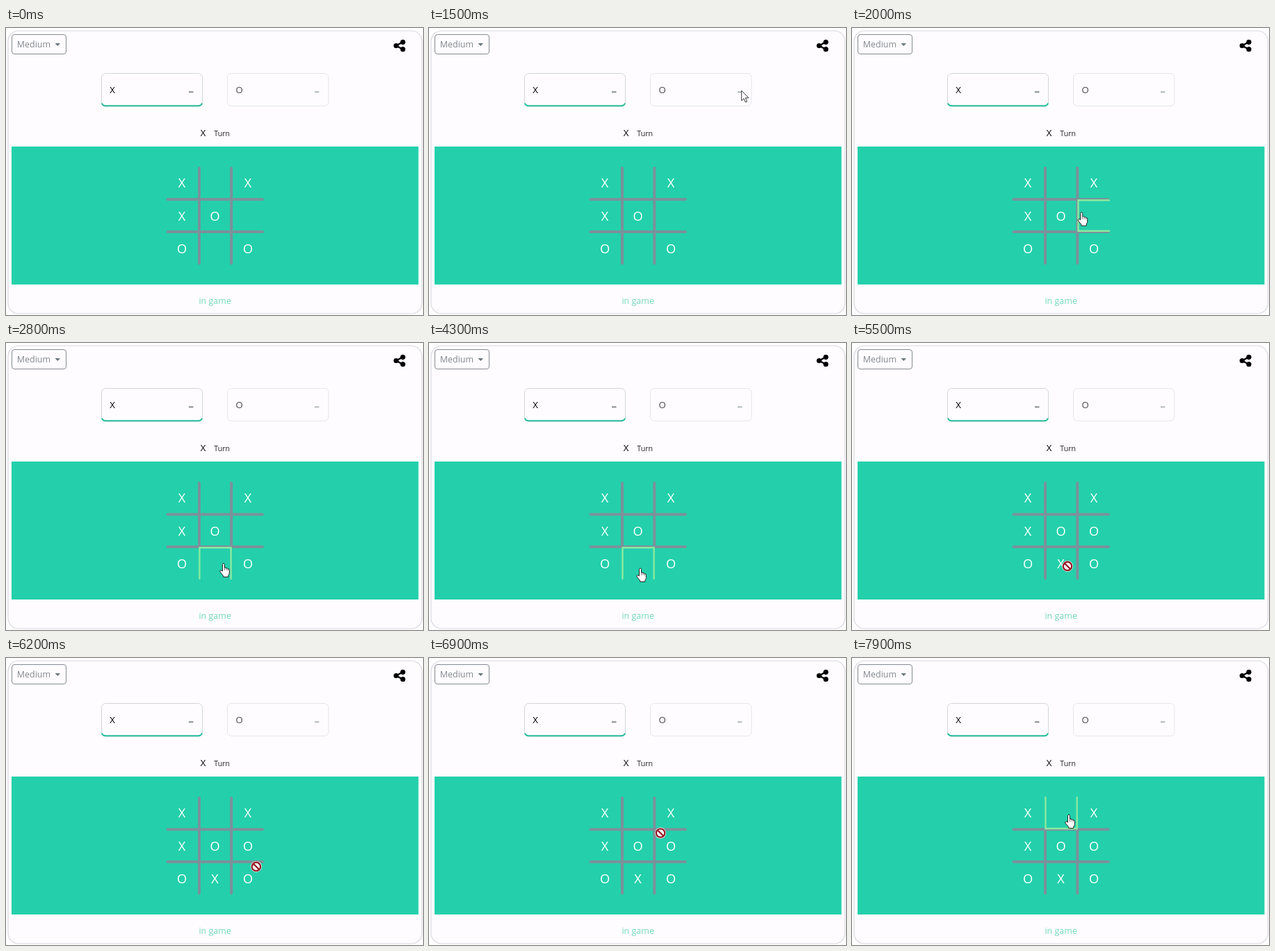
An HTML page for the animation above (8 s loop, 600 by 414 pixels).

```html
<!DOCTYPE html>
<html lang="en">
<head>
<meta charset="utf-8">
<title>Noughts and crosses</title>
<style>
  html, body { margin: 0; width: 100%; height: 100%; overflow: hidden; background: #fff; }
  svg { display: block; width: 600px; height: 414px; font: 12.5px "Open Sans", "Noto Sans", sans-serif; }
  .mark { font-size: 18.3px; fill: #fff; text-anchor: middle; }
  .label { font-size: 13.3px; font-weight: 500; }
  .rules { stroke: #7b919b; stroke-width: 4; stroke-linecap: round; }
  .hover { fill: none; stroke: #8ce9a0; stroke-width: 2.4; }
</style>
</head>
<body>
<svg viewBox="0 0 600 414">
  <rect x="3" y="4" width="595.5" height="408" rx="15" fill="#fefcff" stroke="#d9d6df" stroke-width="1.2"/>

  <rect x="8.5" y="9.5" width="78" height="28" rx="3.5" fill="none" stroke="#858b92"/>
  <text x="15.7" y="28.3" fill="#80868c">Medium</text>
  <path d="M70.5 22h7.6l-3.8 4z" fill="#6c757d"/>

  <g stroke="#000" stroke-width="2.4">
    <path d="M571 20.3L561.3 25.5L571 30.7" fill="none"/>
    <g stroke="none">
      <circle cx="571" cy="20.3" r="3.6"/><circle cx="561.3" cy="25.5" r="3.6"/><circle cx="571" cy="30.7" r="3.6"/>
    </g>
  </g>

  <rect x="137.5" y="65.5" width="145" height="47.5" rx="6" fill="none" stroke="#d3d5d8"/>
  <path d="M138 108.5q1 3.7 5.5 3.7h133q4.500 0 5.500-3.700" fill="none" stroke="#26bd9d" stroke-width="2"/>
  <text class="label" x="149.300" y="94.200">X</text>
  <rect x="263" y="91.300" width="6.500" height="2" fill="#868b90"/>
  <rect x="318.500" y="65.500" width="145.500" height="47" rx="6" fill="none" stroke="#e5e5e9"/>
  <text class="label" x="330.500" y="94.200" fill="#4c4c4e">O</text>
  <rect x="444" y="91.300" width="6.500" height="2" fill="#b2b9b9"/>

  <text id="player" class="label" x="283.500" y="156.200" text-anchor="middle">X</text>
  <text x="299.300" y="155.700" font-size="10.600" fill="#222">Turn</text>

  <rect x="8" y="171" width="585.500" height="199" fill="#23d0ab"/>
  <g id="board">
    <g class="rules" id="rules"></g>
    <path class="rules" d="M232.500 247.200H369M232.500 294H369"/>
    <path class="hover" id="hover"/>
    <g id="marks"></g>
  </g>
  <text x="300.700" y="398" text-anchor="middle" fill="#72d8bd">in game</text>

  <g id="pointer">
    <path id="arrow" d="M0 0V14.500L3.300 11.400L5.600 16.700L7.900 15.700L5.600 10.500H10.300Z" fill="#fff" stroke="#222" stroke-width=".9"/>
    <g id="hand">
      <path d="M-1.500 11V1.500Q-1.300 0 0 0T1.500 1.500V6.400Q3.300 5.300 4 7Q5.700 6.200 6.200 7.900Q8.400 7.300 8.400 9.700V13.500Q8.200 16 6.800 17.200V19.500H-.3V17.800L-4.900 12.200Q-5.500 10.500-4.300 9.900Q-3.200 9.600-1.500 11Z" fill="#fff" stroke="#222" stroke-width="1"/>
      <path d="M1.500 6.500V10M4 7.200V10M6.300 8V10.500" stroke="#444" stroke-width=".7"/>
    </g>
    <g id="denied">
      <circle r="8" fill="#fff"/>
      <path d="M-4.300-4.300L4.300 4.300" stroke="#971c29" stroke-width="2.300"/>
      <circle r="6.200" fill="none" stroke="#971c29" stroke-width="2.300"/>
    </g>
  </g>
</svg>
<script>
const LOOP = 8000, CLICK = 4700, REPLY = 5150;
const $ = id => document.getElementById(id);
const clamp = v => Math.max(0, Math.min(1, v));
const ramp = (t, start, length) => clamp((t - start) / length);
const add = (parent, name, attrs) => {
  const el = document.createElementNS("http://www.w3.org/2000/svg", name);
  for (const key in attrs) el.setAttribute(key, attrs[key]);
  return parent.appendChild(el);
};

// Pointer stops: time, x, y
const stops = [
  [1200, 545, -20], [1500, 450, 90], [1800, 360, 185], [1950, 334, 255],
  [2200, 316, 308], [2800, 313, 318], [3600, 311, 320], [4300, 304, 325],
  [4650, 310, 322], [5500, 310, 322], [6000, 357, 303], [6200, 360, 301],
  [6500, 362, 291], [7000, 326, 243], [7250, 313, 229], [7900, 312, 226], [8000, 312, 226]
];
const xs = [231, 278, 324.5, 371], ys = [200, 247, 294, 341];

const marks = [..."X XXOOOXO"].map((mark, i) => {
  const el = add($("marks"), "text", {
    class: "mark", x: 253 + i % 3 * 47.5, y: 230 + Math.floor(i / 3) * 47.7
  });
  el.textContent = mark;
  return el;
});
const rules = [0, 1, 2].map(row =>
  add($("rules"), "path", {
    d: [278, 324.3].map(x => `M${x} ${row ? ys[row] : 202}V${row < 2 ? ys[row + 1] : 339.500}`).join("")
  }));

function pointerAt(t) {
  const i = stops.findIndex(s => s[0] > t);
  if (i < 1) return null;
  const [a, b] = [stops[i - 1], stops[i]];
  const k = (t - a[0]) / (b[0] - a[0]);
  return [a[1] + (b[1] - a[1]) * k, a[2] + (b[2] - a[2]) * k];
}

function cellAt([x, y]) {
  const col = xs.findIndex((v, i) => x >= v && x < xs[i + 1]);
  const row = ys.findIndex((v, i) => y >= v && y < ys[i + 1]);
  return col < 0 || row < 0 ? -1 : row * 3 + col;
}

function draw(t) {
  const waiting = t >= CLICK && t < REPLY;
  $("player").textContent = waiting ? "O" : "X";
  $("board").setAttribute("opacity", 1 - 0.35 * (ramp(t, CLICK, 250) - ramp(t, REPLY, 220)));
  marks[7].setAttribute("opacity", ramp(t, CLICK + 150, 150) * 0.3 + ramp(t, 5000, 300) * 0.7);
  marks[5].setAttribute("opacity", ramp(t, REPLY, 220));

  const pos = pointerAt(t);
  const cell = pos ? cellAt(pos) : -1;
  const empty = cell === 1 || cell === 7 && t < CLICK || cell === 5 && t < REPLY;
  const kind = cell < 0 || waiting ? "arrow" : empty ? "hand" : "denied";
  for (const id of ["arrow", "hand", "denied"]) $(id).style.display = pos && id === kind ? "" : "none";
  if (pos) $("pointer").setAttribute("transform", `translate(${pos})`);

  const glow = empty ? 1 : cell === 7 && t < 5350 ? 1 - ramp(t, CLICK, 600) : 0;
  rules.forEach((el, row) =>
    el.setAttribute("opacity", cell % 3 === 1 && row === (cell - 1) / 3 ? 1 - glow : 1));
  $("hover").setAttribute("opacity", glow);
  $("hover").setAttribute("d",
    cell === 1 ? "M278.500 200V246H323.700V200" :
    cell === 7 ? "M278.500 341V295.300H323.700V341" :
    cell === 5 ? "M371 248.500H325.500V292.800H371" : "");
}

const begin = performance.now();
function tick() {
  draw((performance.now() - begin) % LOOP);
  requestAnimationFrame(tick);
}
tick();
</script>
</body>
</html>
```
